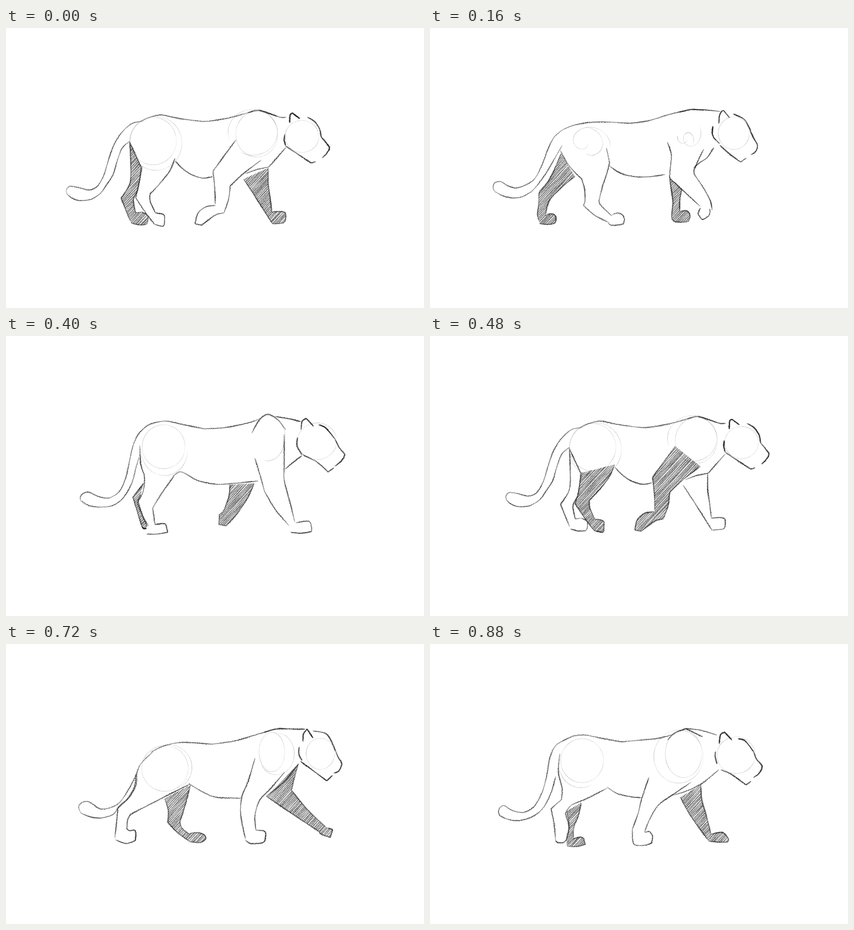
Write an HTML page with a canvas that moves like this. It is 915 px wide and 612 px high and loops after 0.96 s.

```html
<!DOCTYPE html>
<html lang="en">
<head>
<meta charset="utf-8">
<title>Big cat walk cycle</title>
<style>
html, body { margin: 0; width: 100%; height: 100%; overflow: hidden; background: #fff; }
canvas { display: block; width: 915px; height: 612px; }
</style>
</head>
<body>
<canvas id="stage" width="915" height="612"></canvas>
<script>
const W = 915, H = 612, STEP = 80, STEPS = 12, N = 72;

// Key drawings, by step. "x,y" points; "!" marks a sharp corner.
// spine: back, neck, hump, belly, chest. head: ear, face, nose, jaw, cheek.
// Legs: back edge down, paw, front edge up. rings: cx,cy,rx,ry,from,to.
const keys = {
0: {
  tail: ['298,204 275,209 252,230 235,258 224,290 214,322 200,346 182,354 160,349 140,346 132,354 134,364',
    '270,248 254,263 243,292 235,319 222,340 206,362 184,375 160,377 143,371 134,363'],
  spine: ['296,204 315,195 340,190 375,197 410,202 440,204 490,196 540,182', '553,179 575,186 600,195 613,195',
    '530,185 550,180 575,187 594,193', '371,291 385,306 405,320 430,328 452,325', '612,262 575,304! 550,309 525,318'],
  head: ['621,207 622,190 627,186! 643,198', '660,195 675,204 686,220 690,238', '690,238 700,250 708,262 702,274 692,284',
    '612,258 630,270 668,295! 678,292', '610,233 609,245 612,257'],
  nearHind: ['298,303 290,345 284,371! 303,400 325,429', '325,429! 344,433 347,420 345,408 327,404', '327,404 316,380 315,363! 335,342 358,313 370,285'],
  farHind: ['271,248 273,300 271,340 252,372! 263,400 272,422', '274,426! 290,430 308,428 310,410 297,402', '297,402 284,404! 279,375 290,350 296,304! 272,252'],
  nearFront: ['503,245 480,276 453,313! 457,350 458,385', '458,388 437,391 420,405 414,428! 428,431! 453,412! 462,407 477,404', '477,404 487,375 491,345! 520,318 558,289'],
  farFront: ['520,330 545,368 583,428', '583,428! 607,426 612,418 611,404 600,401 582,402', '582,402 578,370 574,340 574,306'],
  rings: ['328,252,57,59,0,360', '322,247,51,52,0,360', '540,228,54,50,-200,120', '549,232,46,50,0,360', '648,237,37,35,0,360']
},
1: {
  tail: ['275,215 258,230 245,258 235,285 220,310 204,328 180,343 160,345 143,335 131,336 127,347 132,358',
    '282,240 270,262 255,292 241,317 218,345 192,365 165,369 142,363 130,354'],
  spine: ['275,215 300,207 340,203 380,202 424,206! 465,201 510,187 560,179', '560,179 595,181 622,187',
    '530,183 560,179 590,181', '387,300 405,312 430,321 455,322 473,319', '612,262 588,292 560,303 536,316'],
  head: ['623,210 625,190 633,180! 645,195', '664,195 680,210 690,230', '690,230! 700,248 706,262 700,277 690,281',
    '628,262 650,282 666,295! 678,288', '603,215 602,235 612,248 628,257'],
  nearHind: ['274,268 288,295 308,315 328,327! 332,355 333,387! 360,408 390,424', '390,424! 398,429 421,427 422,413! 412,403 398,406', '398,408 380,392 366,378! 372,355 380,320 388,293! 374,262'],
  farHind: ['274,275 268,305 257,335 238,362! 245,390 251,418', '254,428! 272,431 290,424 291,410 279,404 267,409', '267,409 267,388 268,375! 283,358 310,327'],
  nearFront: ['499,250 499,275 480,317! 500,345 524,378', '524,384! 500,390 490,397 490,414! 503,419 527,413 545,400', '545,402 554,380 548,350 534,317! 552,294 570,268'],
  farFront: ['538,315 550,345 556,375 548,405', '548,405! 552,421 584,423! 591,411 586,400 570,398', '567,396 567,370 572,335 583,295'],
  rings: ['332,255,58,51,0,360', '335,262,57,51,-70,150', '538,238,47,56,0,360', '533,243,42,50,90,250', '645,228,42,38,0,360']
},
3: {
  tail: ['305,230 283,250 268,280 258,308 245,340 225,352 200,356 182,345 165,336 151,342 150,355 158,363',
    '296,275 272,312 250,342 232,364 205,374 180,371 157,362'],
  spine: ['305,230 330,218 370,209 445,211! 490,205 540,190 585,177', '585,177 620,178 650,178',
    '560,185 585,177 610,178', '398,302 420,318 450,328 500,329 555,321', '630,262 625,274 618,295'],
  head: ['642,207 643,190 650,178! 667,198', '665,181 697,191 715,222', '713,222 718,235 727,250 726,262 715,273',
    '642,251 665,272 694,291! 707,280', '635,215 634,232 640,248'],
  nearHind: ['297,268 312,295 334,328! 345,355 346,381! 338,388! 360,410 388,424', '390,424! 395,433 425,430! 428,420 425,409 410,406 397,412', '397,412 382,398 372,386! 380,350 393,320 398,295 398,262'],
  farHind: ['299,275 280,305 260,335 240,356! 233,385 222,410 226,425', '226,427! 255,428 260,417 257,409 245,408 239,413', '239,413 246,390 265,365 295,340 325,322'],
  nearFront: ['541,250 557,280 562,312 566,338! 610,368 660,403', '660,403! 672,416 702,422! 707,402! 695,393 680,390', '690,392 650,350 614,313! 620,285 628,262'],
  farFront: ['511,328 506,350 507,390 509,420', '509,420! 516,426 546,424 549,410! 540,400 526,403', '526,403 527,380 535,350 545,324'],
  rings: ['350,259,50,46,-170,10', '345,262,53,46,-110,0', '585,235,38,43,-70,120', '577,233,36,44,-60,110', '685,232,26,33,0,360']
},
5: {
  tail: ['310,195 290,214 278,240 270,275 262,310 248,340 225,354 200,350 180,341 165,347 163,358 172,368',
    '291,265 284,290 276,320 258,352 235,370 205,374 180,370 166,360'],
  spine: ['303,200 320,191 350,186 385,193 435,203! 480,200 530,190 558,180', '590,176 620,181 645,187',
    '538,212 555,183 573,171 595,183 612,205', '365,307 380,297 395,302 420,316 460,324 500,322 552,317', '647,262 630,275 611,291'],
  head: ['646,205 648,187 657,180! 673,197', '685,194 700,201 720,225', '720,225! 730,245 741,259 735,272 720,285',
    '650,260 680,275 705,297! 718,288', '638,222 637,240 648,260'],
  nearHind: ['293,240 295,280 303,308 300,340 289,362! 300,395 312,415', '308,433! 330,433 354,429! 350,413 345,410 326,412', '326,412 321,376! 340,345 368,306'],
  farHind: ['301,322 278,352! 286,380 298,418', '298,418 302,421 307,421', '309,416 298,390 287,365! 295,345'],
  nearFront: ['545,268 555,300 566,340! 590,380 620,415', '623,429! 645,431 668,428! 669,420 663,405 635,408', '632,406 622,365 609,315 609,285 609,215'],
  farFront: ['490,325 488,350 476,382 467,390', '467,390 466,412! 482,415', '482,415 505,390 530,352 543,322'],
  rings: ['345,242,47,48,0,360', '347,252,50,53,0,170', '575,222,36,48,-170,10', '572,228,37,45,-20,100', '681,230,43,40,0,360']
},
7: {
  tail: ['335,210 305,225 288,255 278,290 262,320 240,345 215,349 190,335 170,329 161,338 162,348',
    '297,275 282,315 265,345 240,363 210,367 182,360 163,345'],
  spine: ['305,225 325,211 360,202 400,197 440,202 475,203! 515,193 552,186', '585,178 610,183 652,180',
    '543,206 558,188 575,174! 605,196', '398,300 430,315 470,325 535,325', '665,262 640,280 620,300 602,306'],
  head: ['658,207 656,187 663,180! 682,191', '708,200 718,215 727,230', '727,230 746,253! 740,268 725,282',
    '652,255 668,262 690,285 707,299! 718,284', '650,225 650,240 663,260'],
  nearHind: ['298,285 287,310 275,340 254,370! 262,395 268,422', '275,430! 305,432 311,420 307,408! 287,409', '287,409 284,380! 310,355 345,325 375,303 398,298'],
  farHind: ['352,322 365,345 364,372! 385,395 415,421', '418,423! 453,422 457,412 440,398 422,404', '422,404 398,374! 408,345 410,315 400,302'],
  nearFront: ['540,255 538,322! 555,365 573,412', '577,428! 600,432 621,430! 620,412 612,405 590,412', '593,405 590,330 598,260'],
  farFront: ['527,330 540,360 548,380', '548,385! 525,382 520,402! 540,408 565,404', '567,404 558,375 538,327'],
  rings: ['350,262,54,57,0,360', '346,260,44,44,0,360', '578,225,35,45,-30,120', '576,224,36,44,-20,60', '690,232,35,30,0,140']
},
9: {
  tail: ['322,235 295,262 283,290 270,315 250,345 228,358 205,360 182,345 167,346 159,356 164,370',
    '287,282 284,310 270,335 248,354 235,372 210,380 185,378 163,369'],
  spine: ['318,236 345,223 385,215 450,219! 500,212 545,199 590,186', '595,184 630,186 655,186',
    '565,193 590,186 615,186', '400,305 430,323 460,335 515,337', '640,262 610,300 570,333'],
  head: ['650,213 651,197 659,186! 672,205', '672,190 703,198 722,235', '722,235 727,247 735,262 728,278 718,282',
    '645,257 670,275 702,299! 715,287', '642,225 641,240 648,255'],
  nearHind: ['285,285 280,315 262,343 245,358! 242,390 238,425', '240,428! 262,436 283,430! 283,408 270,408 263,402', '265,405 266,385 273,372! 310,353 355,330 403,306'],
  farHind: ['347,338 355,362 354,390! 375,412 402,432', '402,432! 425,434 437,426 433,416 418,412 402,414', '402,416 385,402 381,388! 393,350 404,308'],
  nearFront: ['545,250 530,300 516,335 514,375 524,425', '524,428! 535,436 560,435 567,430! 567,410 547,407', '547,407 545,375 555,342 580,315 610,280'],
  farFront: ['570,333 620,367 685,410', '685,410 690,416 710,423! 715,406! 705,402', '700,400 660,362 625,320! 632,290 640,262'],
  rings: ['348,272,51,50,0,360', '355,270,52,50,-100,60', '582,236,28,43,0,360', '592,240,39,46,-90,150', '688,240,31,34,0,360']
},
11: {
  tail: ['300,207 275,222 262,250 255,290 245,325 228,355 205,368 180,364 162,353 151,361 152,374 165,382',
    '275,290 265,325 248,358 225,377 195,386 170,383 155,375'],
  spine: ['290,212 315,201 340,199 370,205 420,214! 460,210 500,206 538,196', '560,185 590,188 628,199',
    '520,210 535,195 560,185! 597,203', '388,313 410,327 440,334 463,336', '632,275 595,305 560,322 525,332'],
  head: ['633,218 636,198 645,193! 661,210', '675,207 690,212 708,235', '708,235! 715,252 727,267 720,283 708,292',
    '637,275 660,285 692,308! 703,300', '625,235 624,245 628,262'],
  nearHind: ['284,240 281,280 289,315 288,340! 265,360! 272,395 275,430', '275,430! 280,434 292,434 298,428', '298,428 304,400 296,370! 310,352 345,337 388,315'],
  farHind: ['299,365 304,395 298,430', '300,442! 320,443 340,438! 336,425 328,422 314,426', '314,426 315,400 325,375 331,347'],
  nearFront: ['479,292 463,340 455,372 443,405', '443,405! 446,437 470,440 485,435! 487,420 480,410 470,412', '470,410 480,385 500,352 535,327 572,302'],
  farFront: ['548,335 570,375 608,428', '610,431! 630,433 652,433! 653,425 640,412 617,415', '615,415 605,375 595,340 593,308'],
  rings: ['333,255,47,48,0,360', '330,262,48,52,60,180', '544,246,54,58,0,360', '555,240,40,52,0,360', '670,243,42,40,0,360']
}
};

const lerp = (a, b, t) => a + (b - a) * t;

function random(seed) {
  return () => {
    seed = seed + 0x6D2B79F5 | 0;
    let t = Math.imul(seed ^ seed >>> 15, 1 | seed);
    t = t + Math.imul(t ^ t >>> 7, 61 | t) ^ t;
    return ((t ^ t >>> 14) >>> 0) / 4294967296;
  };
}

// Spread N points evenly along a polyline.
function resample(line) {
  const at = [0];
  for (let i = 1; i < line.length; i++)
    at.push(at[i - 1] + Math.hypot(line[i][0] - line[i - 1][0], line[i][1] - line[i - 1][1]));
  const total = at[at.length - 1], out = [];
  for (let k = 0, i = 1; k < N; k++) {
    const d = total * k / (N - 1);
    while (i < line.length - 1 && at[i] < d) i++;
    const t = (d - at[i - 1]) / (at[i] - at[i - 1] || 1);
    out.push([lerp(line[i - 1][0], line[i][0], t), lerp(line[i - 1][1], line[i][1], t)]);
  }
  return out;
}

function curve(text) {
  const p = [];
  for (const word of text.split(' ')) {
    const xy = word.replace('!', '').split(',').map(Number);
    p.push(xy);
    if (word.endsWith('!')) p.push(xy);
  }
  const line = [p[0]];
  for (let i = 0; i < p.length - 1; i++) {
    const a = p[i], b = p[i + 1], before = p[i - 1] || a, after = p[i + 2] || b;
    if (a === b) continue;
    for (let k = 1; k <= 16; k++) {
      const t = k / 16, s = 1 - t;
      line.push([0, 1].map(c =>
        a[c] * s * s * (1 + 2 * t) + b[c] * t * t * (3 - 2 * t) +
        (b[c] - before[c]) * .45 * t * s * s - (after[c] - a[c]) * .45 * t * t * s));
    }
  }
  return resample(line);
}

function ring(text) {
  const [x, y, rx, ry, from, to] = text.split(',').map(Number);
  return Array.from({ length: N }, (_, i) => {
    const a = lerp(from, to, i / (N - 1)) * Math.PI / 180;
    return [x + rx * Math.cos(a), y + ry * Math.sin(a)];
  });
}

const mapParts = (pose, fn) => Object.fromEntries(Object.entries(pose).map(
  ([name, lines]) => [name, lines.map((line, i) => fn(line, name, i))]));

const between = (a, b) => mapParts(a, (line, name, i) =>
  line.map(([x, y], k) => [(x + b[name][i][k][0]) / 2, (y + b[name][i][k][1]) / 2]));

const poses = [];
for (const k in keys) poses[k] = mapParts(keys[k], (s, name) => name === 'rings' ? ring(s) : curve(s));

// Half a cycle later the near and far legs trade places.
const half = mapParts(poses[0], line => line.map(([x, y]) => [x + 34, y - 4]));
poses[6] = { ...half, nearHind: half.farHind, farHind: half.nearHind, nearFront: half.farFront, farFront: half.nearFront };
for (const k of [2, 4, 8, 10]) poses[k] = between(poses[k - 1], poses[k + 1]);

function pencil(g, line, width, dark, rnd) {
  const p1 = rnd() * 6, p2 = rnd() * 6;
  let len = 0;
  for (let i = 1; i < line.length; i++) {
    const [x0, y0] = line[i - 1], [x1, y1] = line[i];
    const d = Math.hypot(x1 - x0, y1 - y0), n = Math.ceil(d / .6);
    for (let k = 0; k < n; k++) {
      const t = k / n, u = (i - 1 + t) / (line.length - 1), s = len + d * t;
      const press = (.72 + .2 * Math.sin(s / 17 + p1) + .14 * Math.sin(s / 7 + p2)) * Math.min(1, .4 + 8 * u * (1 - u));
      const w = width * (.55 + .5 * press);
      for (let j = 0; j < width * 1.3; j++) {
        g.globalAlpha = Math.min(1, dark * press * (.4 + .7 * rnd()));
        g.fillRect(lerp(x0, x1, t) + (rnd() + rnd() - 1) * w * .75 - .5,
          lerp(y0, y1, t) + (rnd() + rnd() - 1) * w * .75 - .5, 1, 1);
      }
    }
    len += d;
  }
}

function outline(g, leg) {
  g.beginPath();
  for (const [x, y] of leg.flat()) g.lineTo(x, y);
  g.closePath();
}

function hatch(g, leg, rnd) {
  const pts = leg.flat(), xs = pts.map(p => p[0]), ys = pts.map(p => p[1]);
  const left = Math.min(...xs), right = Math.max(...xs), top = Math.min(...ys), low = Math.max(...ys);
  g.save();
  outline(g, leg);
  g.clip();
  g.globalAlpha = .12;
  g.fillRect(left, top, right - left, low - top);
  const wide = right - left, rise = wide * 1.1;
  for (let y = top; y < low + rise; y += 4 + rnd() * 1.6)
    pencil(g, [[left, y], [right, y - rise + rnd() * 4]], 1.6, .42, rnd);
  g.restore();
}

function draw(pose, seed) {
  const sheet = document.createElement('canvas');
  sheet.width = W;
  sheet.height = H;
  const g = sheet.getContext('2d'), rnd = random(seed * 977 + 5);
  const ink = (lines, width, dark) => lines.forEach(line => pencil(g, line, width, dark, rnd));
  g.fillStyle = '#fff';
  g.fillRect(0, 0, W, H);
  g.fillStyle = '#1c1c1c';
  for (const leg of [pose.farHind, pose.farFront]) {
    hatch(g, leg, rnd);
    ink(leg, 2.2, .62);
  }
  g.globalAlpha = 1;
  g.fillStyle = '#fff';
  for (const leg of [pose.nearHind, pose.nearFront]) {
    outline(g, leg);
    g.fill();
  }
  g.fillStyle = '#1c1c1c';
  ink(pose.rings, .7, .2);
  ink(pose.tail, 2, .55);
  ink(pose.spine, 2.2, .62);
  ink(pose.nearHind, 2.2, .66);
  ink(pose.nearFront, 2.2, .66);
  ink(pose.head, 2.4, .7);
  return sheet;
}

const sheets = poses.map(draw);
const view = document.getElementById('stage').getContext('2d');
let start;

function tick(now) {
  start ??= now;
  view.drawImage(sheets[Math.floor((now - start) / STEP) % STEPS], 0, 0);
  requestAnimationFrame(tick);
}
view.drawImage(sheets[0], 0, 0);
requestAnimationFrame(tick);
</script>
</body>
</html>
```
